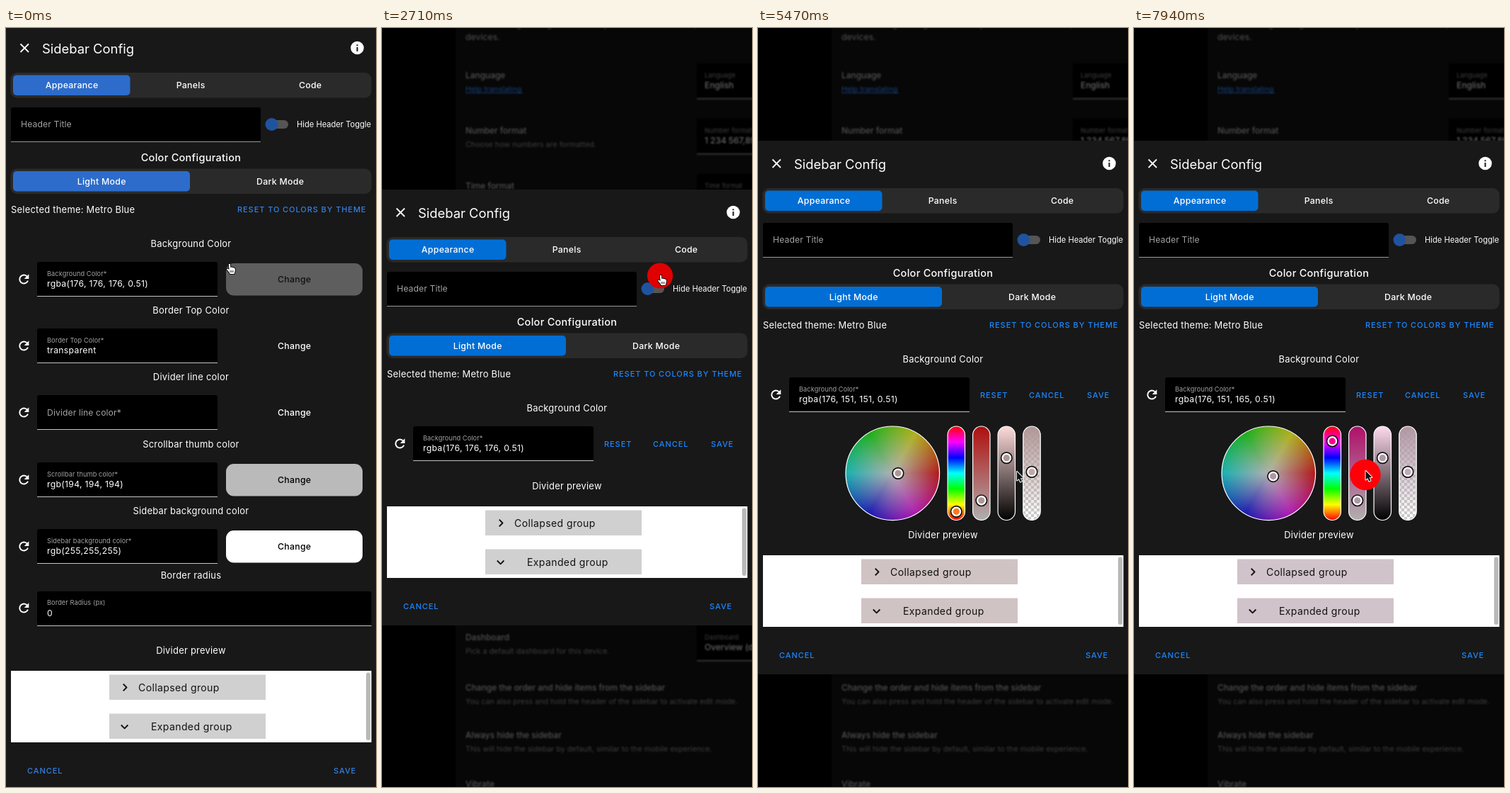
An HTML page with a canvas for the animation above (8 s loop, 523 by 1071 pixels).

```html
<!DOCTYPE html>
<html lang="en">
<head>
<meta charset="utf-8">
<title>Sidebar Config</title>
<style>
html, body { margin: 0; width: 100%; height: 100%; overflow: hidden; background: #181818; }
canvas { display: block; width: 523px; height: 1071px; }
</style>
</head>
<body>
<canvas id="stage"></canvas>
<script>
const W = 523, H = 1071, LOOP = 8000, TAU = Math.PI * 2;
const OPEN_EDITOR = 2650, OPEN_PICKER = 2770;
const VALUE = 0.69, ALPHA = 0.51;
const dpr = window.devicePixelRatio || 1;

function makeContext(canvas) {
  canvas.width = W * dpr;
  canvas.height = H * dpr;
  const context = canvas.getContext('2d');
  context.scale(dpr, dpr);
  return context;
}
let ctx = makeContext(document.getElementById('stage'));

// Text styles: size, weight, letter spacing
const STYLE = {
  title: [18.4, 400, 0],
  head: [14.5, 500, 0.28],
  body: [12.9, 400, 0.26],
  tab: [12.3, 500, 0.3],
  link: [11, 500, 0.92],
  field: [12.2, 400, 0.1],
  value: [12.2, 400, 0.31],
  label: [9.2, 400, 0.1],
  small: [11.1, 400, 0.02],
  group: [14, 400, 0.4],
  setting: [11.9, 500, 0],
  note: [10.7, 400, 0]
};

function text(str, x, y, style, color = '#fff', align = 'left') {
  const [size, weight, spacing] = STYLE[style];
  ctx.font = `${weight} ${size}px Inter, sans-serif`;
  ctx.letterSpacing = spacing + 'px';
  ctx.textAlign = align;
  ctx.fillStyle = color;
  ctx.fillText(str, x + (align === 'center' ? spacing / 2 : 0), y + size * 0.36);
}
const centered = (str, x, y, style, color) => text(str, x, y, style, color, 'center');

function box(x, y, w, h, color, radius = 0) {
  ctx.fillStyle = color;
  ctx.beginPath();
  ctx.roundRect(x, y, w, h, radius);
  ctx.fill();
}

function disc(x, y, r, color) {
  ctx.fillStyle = color;
  ctx.beginPath();
  ctx.arc(x, y, r, 0, TAU);
  ctx.fill();
}

function line(points, color, width) {
  ctx.strokeStyle = color;
  ctx.lineWidth = width;
  ctx.beginPath();
  for (const [x, y] of points) ctx.lineTo(x, y);
  ctx.stroke();
}

const css = ([r, g, b], a = 1) => `rgba(${r}, ${g}, ${b}, ${a})`;

function hsv(h, s, v) {
  return [5, 3, 1].map(n => {
    const k = (n + h / 60) % 6;
    return Math.round(255 * v * (1 - s * Math.max(0, Math.min(k, 4 - k, 1))));
  });
}

// Motion: [time, value...] keys with smooth steps in between
function track(keys, t) {
  let i = 0;
  while (i < keys.length - 2 && t >= keys[i + 1][0]) i++;
  const a = keys[i], b = keys[i + 1];
  const p = Math.max(0, Math.min(1, (t - a[0]) / (b[0] - a[0])));
  const e = p * p * (3 - 2 * p);
  return [1, 2].map(n => a[n] + (b[n] - a[n]) * e);
}

const HUE_SAT = [
  [0, 0, 0], [4300, 0, 0], [4750, 0, 0.142], [6630, 0, 0.142],
  [6631, 165.6, 0.142], [6720, 165.6, 0.142], [7480, 326.4, 0.142], [8000, 326.4, 0.142]
];
const POINTER = [
  [0, 316, 333, 'hand'], [60, 317, 334, 'hand'], [440, 420, 356, 'hand'], [820, 440, 450, 'hand'],
  [1120, 430, 580, 'hand'], [1400, 370, 420, 'arrow'], [1660, 225, 306, 'beam'],
  [1760, 225, 306, 'arrow'], [2040, 400, 256, 'hand'], [2180, 420, 225, 'arrow'],
  [2400, 394, 349, 'hand'], [2770, 394, 349, 'arrow'], [3410, 300, 640, 'arrow'],
  [3680, 250, 655, 'arrow'], [3900, 349, 645, 'arrow'], [3960, 349, 645, 'arrow'],
  [4180, 317, 682, 'arrow'], [4300, 317, 682, 'arrow'], [4750, 317, 666, 'arrow'],
  [5120, 317, 666, 'arrow'], [5440, 366, 626, 'arrow'], [5520, 366, 626, 'arrow'],
  [5900, 300, 670, 'arrow'], [6560, 271.5, 631, 'arrow'], [6720, 271.5, 631, 'arrow'],
  [7480, 276, 583, 'arrow'], [7560, 278, 602, 'arrow'], [7650, 325, 672, 'arrow'],
  [7800, 325, 672, 'arrow'], [7900, 327.5, 625, 'arrow'], [8000, 327.5, 625, 'arrow']
];
const PRESSES = [[2650, 2800], [4290, 4820], [6630, 7540], [7820, 8000]];

const colorAt = t => {
  const [h, s] = track(HUE_SAT, t);
  return hsv(h, s, VALUE);
};

// The preview follows the chosen colour with a delay
function previewColor(t) {
  const steps = 16, sum = [0, 0, 0];
  for (let i = 0; i < steps; i++) {
    colorAt(Math.max(0, t - i * 20)).forEach((c, n) => sum[n] += c / steps);
  }
  return css(sum.map(c => Math.round(c * ALPHA + 118)));
}

function inputBox(x, y, w, lineColor) {
  box(x, y, w, 49, '#000', [3, 3, 0, 0]);
  box(x, y + 48, w, 1, lineColor);
}

function reloadIcon(y) {
  ctx.strokeStyle = ctx.fillStyle = '#fff';
  ctx.lineWidth = 1.9;
  ctx.beginPath();
  ctx.arc(25.3, y, 6, 0.35, TAU - 0.8);
  ctx.stroke();
  ctx.beginPath();
  ctx.moveTo(32.3, y - 7.2);
  ctx.lineTo(32.3, y - 0.6);
  ctx.lineTo(25.7, y - 0.6);
  ctx.fill();
}

function colorField(y, label, value) {
  reloadIcon(y + 24.5);
  inputBox(44, y, 255, '#c4c4c4');
  if (value) {
    text(label + '*', 58, y + 16.5, 'label', '#a2a2a2');
    text(value, 58, y + 31, 'value');
  } else {
    text(label + '*', 58, y + 25, 'field', '#a2a2a2');
  }
}

function segments(y, selectedWidth, blue, labels) {
  box(6.5, y, 510, 35.5, '#2a2a2a', 9);
  box(10, y + 3.5, selectedWidth, 28.5, blue, 5);
  for (const [label, x] of labels) centered(label, x, y + 18, 'tab');
}

function header(blue, linkColor) {
  line([[20.5, 22.5], [32, 34]], '#fff', 1.8);
  line([[32, 22.5], [20.5, 34]], '#fff', 1.8);
  text('Sidebar Config', 51, 29, 'title');
  disc(496.5, 28, 9.3, '#fff');
  box(495.5, 23.3, 2, 2, '#181818');
  box(495.5, 27, 2, 6, '#181818');

  segments(63, 165.5, blue, [['Appearance', 93], ['Panels', 261], ['Code', 430]]);
  inputBox(7, 112, 353, '#999');
  text('Header Title', 21, 136, 'field', '#a2a2a2');
  box(370, 130, 29, 12, '#555', 6);
  disc(375.5, 136, 9, '#20539f');
  text('Hide Header Toggle', 411, 136.5, 'small');

  centered('Color Configuration', 261.3, 183, 'head');
  segments(198.5, 250, blue, [['Light Mode', 135], ['Dark Mode', 387.5]]);
  text('Selected theme: Metro Blue', 7, 256.5, 'body');
  text('RESET TO COLORS BY THEME', 327, 256.5, 'link', linkColor);
  centered('Background Color', 261.3, 304, 'body');
}

function changeButton(y, fill, color) {
  if (fill) box(311, y + 2, 193, 45.5, fill, 11);
  centered('Change', 407.5, y + 25, 'tab', color);
}

function colorList() {
  const rows = [
    ['Background Color', 'rgba(176, 176, 176, 0.51)', '#5e5e5e', '#111'],
    ['Border Top Color', 'transparent', '', '#fff'],
    ['Divider line color', '', '', '#fff'],
    ['Scrollbar thumb color', 'rgb(194, 194, 194)', '#bababa', '#000'],
    ['Sidebar background color', 'rgb(255,255,255)', '#fff', '#000']
  ];
  rows.forEach(([label, value, fill, color], i) => {
    const y = Math.round(330 + i * 94.2);
    if (i) centered(label, 261.3, y - 25.5, 'body');
    colorField(y, label, value);
    changeButton(y, fill, color);
  });
  centered('Border radius', 261.3, 772, 'body');
  reloadIcon(818.5);
  inputBox(44, 795, 472.5, '#c4c4c4');
  text('Border Radius (px)', 58, 811, 'label', '#a2a2a2');
  text('0', 58, 825.5, 'value');
}

function preview(y, fill, linkColor) {
  centered('Divider preview', 261.3, y, 'body');
  box(7, y + 28.5, 509.5, 101, '#fff');
  box(509, y + 31, 6, 95.5, '#b9b9b9', 3);
  const top = y + 34, bottom = y + 89;
  box(146, top, 221, 35.5, fill);
  box(146, bottom, 221, 35.5, fill);
  line([[165.7, top + 13.2], [170.5, top + 18], [165.7, top + 22.8]], '#111', 1.9);
  line([[162.8, bottom + 16], [167.6, bottom + 20.8], [172.4, bottom + 16]], '#111', 1.9);
  text('Collapsed group', 187, y + 52.5, 'group', '#111');
  text('Expanded group', 205, y + 107.5, 'group', '#111');
  text('CANCEL', 30, y + 170, 'link', linkColor);
  text('SAVE', 463, y + 170, 'link', linkColor);
}

function handle(x, y, color) {
  disc(x, y, 8.6, '#111');
  disc(x, y, 6.9, '#fff');
  disc(x, y, 4.6, color);
}

function slider(x, top, stops, level, color, checker) {
  ctx.save();
  ctx.beginPath();
  ctx.roundRect(x - 12.2, top, 24.4, 132.5, 12.2);
  ctx.save();
  ctx.clip();
  if (checker) {
    ctx.fillStyle = '#fff';
    ctx.fillRect(x - 13, top, 26, 133);
    ctx.fillStyle = '#ccc';
    for (let i = 0; i < 7; i++) {
      for (let j = i % 2; j < 34; j += 2) ctx.fillRect(x - 13 + i * 4, top + j * 4, 4, 4);
    }
  }
  const gradient = ctx.createLinearGradient(0, top, 0, top + 132.5);
  stops.forEach((stop, i) => gradient.addColorStop(i / (stops.length - 1), stop));
  ctx.fillStyle = gradient;
  ctx.fillRect(x - 13, top, 26, 133);
  ctx.restore();
  ctx.strokeStyle = '#fff';
  ctx.lineWidth = 1.2;
  ctx.stroke();
  ctx.restore();
  handle(x, top + 120.3 - level * 109.6, color);
}

function picker(hue, sat, color) {
  const x = 190.3, y = 465.3, r = 66.3, top = 399;
  const wheel = ctx.createConicGradient(0, x, y);
  for (let i = 0; i <= 12; i++) wheel.addColorStop(i / 12, css(hsv(360 - i * 30, 1, VALUE)));
  disc(x, y, r, wheel);
  const center = ctx.createRadialGradient(x, y, 0, x, y, r);
  center.addColorStop(0, css([176, 176, 176]));
  center.addColorStop(1, css([176, 176, 176], 0.14));
  disc(x, y, r, center);
  ctx.strokeStyle = '#fff';
  ctx.lineWidth = 1.2;
  ctx.stroke();
  const angle = hue * Math.PI / 180, reach = sat * 54;
  handle(x + Math.cos(angle) * reach, y - Math.sin(angle) * reach, css(color));

  const rainbow = Array.from({ length: 7 }, (_, i) => css(hsv(360 - i * 60, 1, 1)));
  slider(280.3, top, rainbow, hue / 360, hue < 1 ? '#ff7a1a' : css(hsv(hue, 1, 1)));
  slider(315.8, top, [css(hsv(hue, 0.92, VALUE)), css(hsv(hue, 0, VALUE))], sat, css(color));
  slider(351.3, top, [css(hsv(hue, sat, 1)), '#000'], VALUE, css(color));
  slider(387, top, [css(color), css(color, 0)], ALPHA, css(color.map(c => c + 18)), true);
}

function drawBackdrop() {
  box(0, 0, W, H, '#000');
  box(104, 0, W - 104, H, '#070707');
  ctx.filter = `blur(${1.2 * dpr}px)`;
  const bright = '#525252', dim = '#3e3e3e', link = '#17427f';
  const setting = (y, title, note, noteColor = dim) => {
    text(title, 118, y, 'setting', bright);
    text(note, 118, y + 19, 'note', noteColor);
  };
  const select = (y, label, value) => {
    box(445, y, 90, 50, '#000');
    box(445, y + 49, 90, 1.5, '#444');
    text(label, 456, y + 17, 'label', dim);
    text(value, 456, y + 31, 'setting', '#666');
  };
  text('The following settings are tied to your account and will persist on all', 118, -5, 'field', dim);
  text('devices.', 118, 13, 'field', bright);
  setting(67, 'Language', 'Help translating', link);
  setting(145, 'Number format', 'Choose how numbers are formatted.');
  setting(223, 'Time format', '');
  setting(860, 'Dashboard', 'Pick a default dashboard for this device.');
  setting(931, 'Change the order and hide items from the sidebar',
    'You can also press and hold the header of the sidebar to activate edit mode.');
  setting(998, 'Always hide the sidebar',
    'This will hide the sidebar by default, similar to the mobile experience.');
  setting(1067, 'Vibrate', '');
  box(118, 91, 81, 1, link);
  select(50, 'Language', 'English');
  select(128, 'Number format', '1 234 567,89');
  select(206, 'Time format', 'Auto');
  select(843, 'Dashboard', 'Overview (default)');
  ctx.filter = 'none';
}

function shape(points, x, y, fill, stroke) {
  ctx.beginPath();
  for (const [px, py] of points) ctx.lineTo(x + px, y + py);
  ctx.closePath();
  ctx.lineJoin = 'round';
  ctx.strokeStyle = stroke;
  ctx.lineWidth = 2;
  ctx.stroke();
  ctx.fillStyle = fill;
  ctx.fill();
}

const ARROW = [[0, 0], [0, 12.5], [2.8, 10], [4.8, 14.5], [7, 13.6], [5, 9.2], [8.8, 9]];
const HAND = [[-1.2, 0], [0.8, 0], [1.4, 5], [3, 4.5], [4.6, 5.2], [6.2, 5.2], [8, 7],
  [7.5, 11], [6.5, 14], [0.8, 14], [-1.5, 10.5], [-4, 7.5], [-2.8, 6.4], [-0.4, 8]];

function pointer(t) {
  const [x, y] = track(POINTER, t);
  const kind = POINTER.filter(key => key[0] <= t).pop()[3];
  const press = PRESSES.find(([from, to]) => t >= from && t < to);
  if (press) {
    const radius = Math.min(22, 14.5 + (t - press[0]) * 0.06);
    if (t < OPEN_PICKER) disc(x - 1, y + 0.5, radius, '#e00000');
    else disc(x - 0.5, y + 5.5, radius, '#ff0008');
  }
  if (kind === 'beam') {
    const bars = [[[-3.5, -7], [-1, -7], [0, -6], [1, -7], [3.5, -7]], [[0, -6], [0, 7]],
      [[-3.5, 8], [-1, 8], [0, 7], [1, 8], [3.5, 8]], [[-2, 2], [2, 2]]];
    for (const [color, width] of [['#fff', 3], ['#111', 1.2]]) {
      for (const bar of bars) line(bar.map(([px, py]) => [x + px, y + py]), color, width);
    }
  } else if (kind === 'hand') {
    shape(HAND, x, y, '#fff', '#111');
    for (let i = 0; i < 3; i++) line([[x + 1 + i * 2, y + 9], [x + 1 + i * 2, y + 12]], '#111', 0.8);
  } else {
    shape(ARROW, x, y, '#111', '#fff');
  }
}

const backdrop = document.createElement('canvas');
const stage = ctx;
ctx = makeContext(backdrop);
drawBackdrop();
ctx = stage;

function draw(t) {
  const blue = t < 60 ? '#2d6ccb' : '#006ed5';
  const linkColor = t < 60 ? '#3480e6' : '#1c87ff';
  const editing = t >= OPEN_EDITOR, picking = t >= OPEN_PICKER;
  const offset = picking ? 163 : editing ? 232 : 0;
  ctx.drawImage(backdrop, 0, 0, W, H);
  box(0, offset - 4, W, picking ? 753 : editing ? 615 : 1079, '#181818');

  ctx.save();
  ctx.translate(0, offset);
  header(blue, linkColor);
  if (editing) {
    const [hue, sat] = track(HUE_SAT, t);
    const color = colorAt(t);
    colorField(330, 'Background Color', `rgba(${color.join(', ')}, ${ALPHA})`);
    text('RESET', 314, 355, 'link', linkColor);
    text('CANCEL', 383, 355, 'link', linkColor);
    text('SAVE', 465, 355, 'link', linkColor);
    if (picking) picker(hue, sat, color);
  } else {
    colorList();
  }
  preview(picking ? 552.5 : editing ? 414.5 : 878.5, previewColor(t), linkColor);
  ctx.restore();
  pointer(t);
}

let start;
function tick(now) {
  start ??= now;
  draw((now - start) % LOOP);
  requestAnimationFrame(tick);
}
draw(0);
requestAnimationFrame(tick);
</script>
</body>
</html>
```
